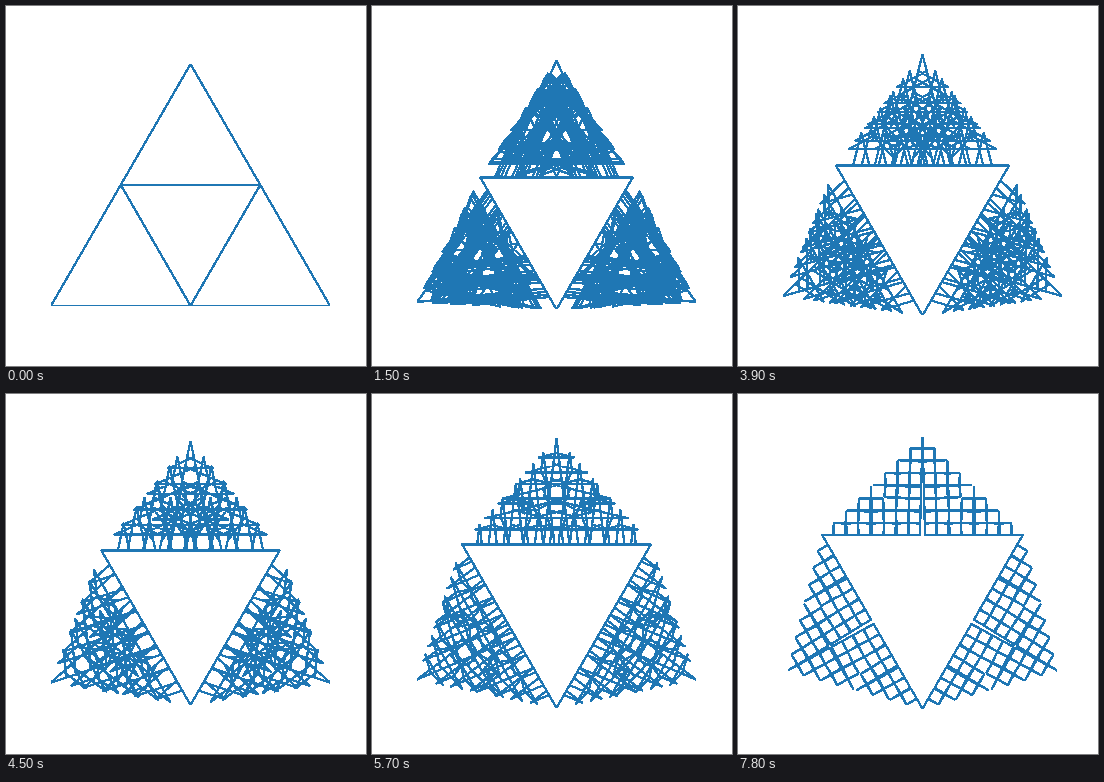
Recreate the animation shown at these times as an HTML page with a canvas. Size 360 by 360 pixels, loop 8000 ms.

```html
<!DOCTYPE html>
<html lang="en">
<head>
<meta charset="utf-8">
<title>Folding snowflake</title>
<style>
html, body { margin: 0; width: 100%; height: 100%; overflow: hidden; background: #fff; }
canvas { display: block; }
</style>
</head>
<body>
<canvas id="stage" width="360" height="360"></canvas>
<script>
const SIZE = 360, LOOP = 8000, STEP = 300, DEPTH = 4;
const BOX = { cx: 184.5, cy: 178.9, w: 279, h: 271.6 };
const RAD = Math.PI / 180;
const ctx = document.getElementById('stage').getContext('2d', { willReadFrequently: true });
ctx.strokeStyle = '#1f77b4';
ctx.lineWidth = 1.5;
ctx.lineJoin = ctx.lineCap = 'round';

// Three sides of a triangle, each folded into four equal segments per level.
function snowflake(angle) {
  const ratio = 1 / (2 * (1 + Math.cos(angle)));
  const pts = [[0, 0]];
  let x = 0, y = 0;
  function side(len, dir, depth) {
    if (!depth) {
      x += len * Math.cos(dir);
      y += len * Math.sin(dir);
      pts.push([x, y]);
      return;
    }
    for (const turn of [0, -angle, angle, 0]) side(len * ratio, dir + turn, depth - 1);
  }
  for (let i = 0; i < 3; i++) side(1, i * 120 * RAD, DEPTH);
  return pts;
}

// Lines have no soft edges: every touched pixel becomes solid.
function harden() {
  const img = ctx.getImageData(0, 0, SIZE, SIZE), d = img.data;
  for (let i = 0; i < d.length; i += 4) {
    d[i] = 31;
    d[i + 1] = 119;
    d[i + 2] = 180;
    d[i + 3] = d[i + 3] > 16 ? 255 : 0;
  }
  ctx.putImageData(img, 0, 0);
}

function draw(step) {
  const pts = snowflake((120 - step * 120 / 99) * RAD);
  const xs = pts.map(p => p[0]), ys = pts.map(p => p[1]);
  const left = Math.min(...xs), top = Math.min(...ys);
  const w = Math.max(...xs) - left, h = Math.max(...ys) - top;
  const k = Math.min(BOX.w / w, BOX.h / h);
  const x0 = BOX.cx - w * k / 2, y0 = BOX.cy - h * k / 2;

  ctx.clearRect(0, 0, SIZE, SIZE);
  ctx.save();
  // The plot area fits the curve tightly and trims its outermost strokes.
  const cl = Math.round(x0), ct = Math.round(y0);
  ctx.beginPath();
  ctx.rect(cl, ct, Math.round(x0 + w * k) - cl, Math.round(y0 + h * k) - ct);
  ctx.clip();
  ctx.beginPath();
  for (const [x, y] of pts) ctx.lineTo(x0 + (x - left) * k, y0 + (y - top) * k);
  ctx.stroke();
  ctx.restore();
  harden();
}

let shown = -1;
function tick() {
  const step = Math.floor(performance.now() % LOOP / STEP);
  if (step !== shown) draw(shown = step);
  requestAnimationFrame(tick);
}
tick();
</script>
</body>
</html>
```
